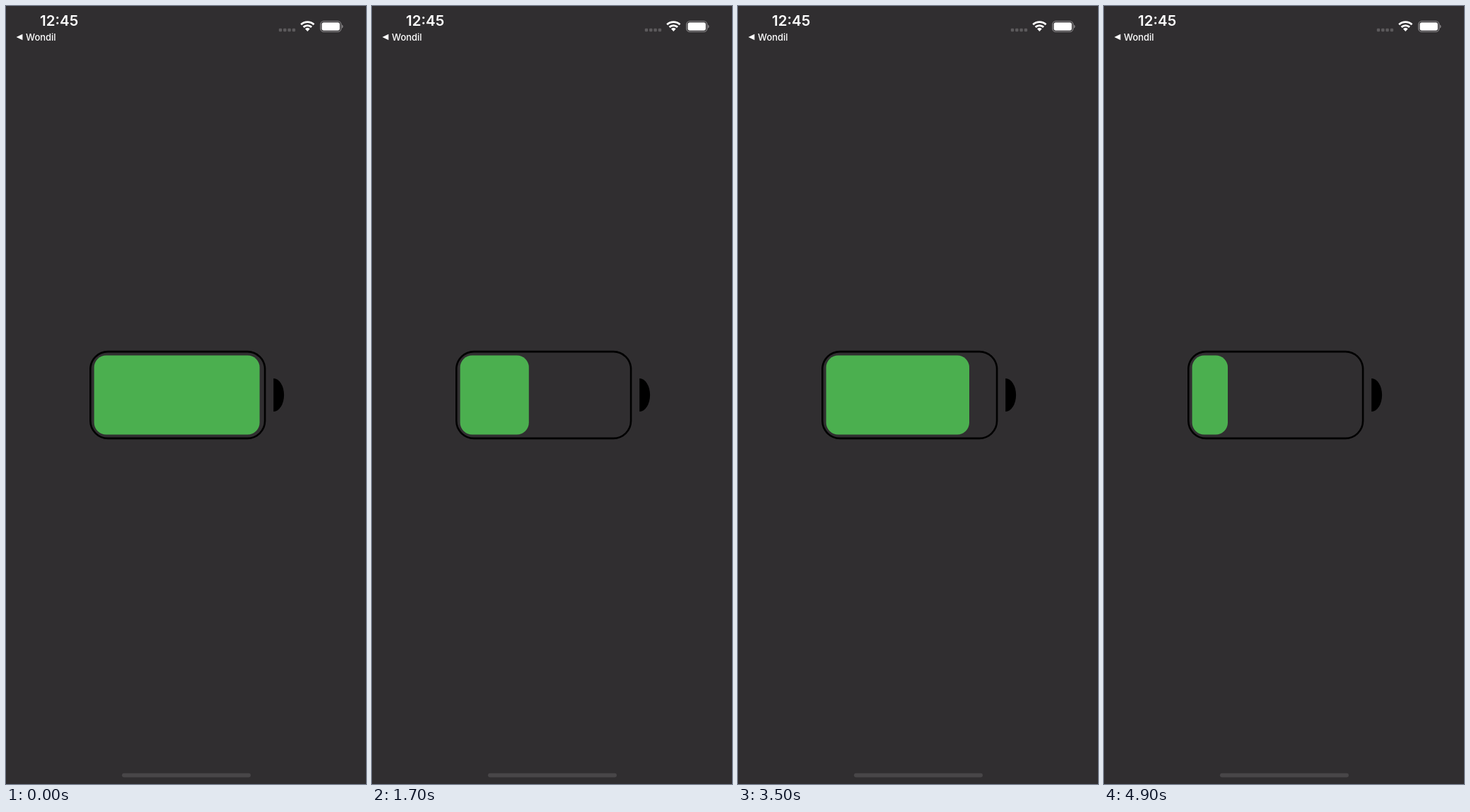
Animation, 509 px wide and 1101 px high, one loop 5 s. Source, as an HTML page:

```html
<!DOCTYPE html>
<html lang="en">
<head>
<meta charset="utf-8">
<title>Charging battery</title>
<style>
@property --level {
  syntax: '<length>';
  inherits: false;
  initial-value: 0px;
}
html, body {
  margin: 0;
  width: 100%;
  height: 100%;
  overflow: hidden;
  background: #302e30;
}
svg {
  position: absolute;
  left: 0;
  top: 0;
  display: block;
}
text {
  font-family: Inter, Roboto, sans-serif;
  fill: #fff;
}
/* The visible part is the rounded inset, so its width can be fractional. */
.charge {
  position: absolute;
  left: 124px;
  top: 494px;
  width: 238px;
  height: 113px;
  background: #4baf4f;
  clip-path: inset(.4px calc(237.4px - var(--level)) .4px .6px round 17px);
  animation: charge 5s infinite;
}
/* Steady fill, refreshed ten times a second, with a pause at 0.4 s and 1.6 s. */
@keyframes charge {
  0%   { --level: 234px;   animation-timing-function: step-end; }
  2%   { --level: 2.5px;   animation-timing-function: steps(2, end); }
  6%   { --level: 14.5px;  animation-timing-function: step-end; }
  10%  { --level: 27px;    animation-timing-function: step-end; }
  12%  { --level: 33.5px;  animation-timing-function: steps(4, end); }
  20%  { --level: 52px;    animation-timing-function: steps(5, end); }
  30%  { --level: 84px;    animation-timing-function: step-end; }
  34%  { --level: 97.2px;  animation-timing-function: steps(5, end); }
  44%  { --level: 125.5px; animation-timing-function: steps(6, end); }
  56%  { --level: 162.3px; animation-timing-function: steps(6, end); }
  68%  { --level: 197px;   animation-timing-function: steps(1, end); }
  70%  { --level: 202.4px; animation-timing-function: steps(5, end); }
  80%  { --level: 230px;   animation-timing-function: step-end; }
  82%  { --level: 3px;     animation-timing-function: steps(8, end); }
  98%  { --level: 50.4px;  animation-timing-function: step-end; }
  100% { --level: 234px; }
}
</style>
</head>
<body>
<svg width="509" height="1101" viewBox="0 0 509 1101">
  <!-- status bar -->
  <text x="48" y="28" font-size="20.5" font-weight="600">12:45</text>
  <path d="M14.6 44 L23.4 39.8 V48.2 Z" fill="#fff"/>
  <text x="28" y="49" font-size="13" font-weight="500">Wondil</text>

  <g fill="#5c5a5c">
    <rect x="385.8" y="31.8" width="4.4" height="4.4" rx="1.2"/>
    <rect x="392.1" y="31.8" width="4.4" height="4.4" rx="1.2"/>
    <rect x="398.4" y="31.8" width="4.4" height="4.4" rx="1.2"/>
    <rect x="404.7" y="31.8" width="4.4" height="4.4" rx="1.2"/>
  </g>

  <g transform="translate(426.3 36)" fill="none" stroke="#fff" stroke-width="2.9">
    <path d="M-9.14 -9.8 A13.4 13.4 0 0 1 9.14 -9.8"/>
    <path d="M-5.73 -6.14 A8.4 8.4 0 0 1 5.73 -6.14"/>
    <path d="M0 0 L-3.41 -3.66 A5 5 0 0 1 3.41 -3.66 Z" fill="#fff" stroke="none"/>
  </g>

  <rect x="444.7" y="21.5" width="29" height="15" rx="4.6" fill="none" stroke="#8c8a8c" stroke-width="1.2"/>
  <rect x="446.5" y="23.2" width="25.4" height="11.6" rx="2.8" fill="#fff"/>
  <path d="M475 26.6 A2.6 2.6 0 0 1 475 31.4 Z" fill="#8c8a8c"/>

  <!-- battery -->
  <rect x="119.3" y="489.1" width="246.8" height="122.8" rx="24.8" fill="none" stroke="#000" stroke-width="2.6"/>
  <path d="M378.2 527 A14.9 23.5 0 0 1 378.2 574 Z"/>

  <rect x="164" y="1085.7" width="182" height="5.8" rx="2.9" fill="#484648"/>
</svg>
<div class="charge"></div>
</body>
</html>
```
